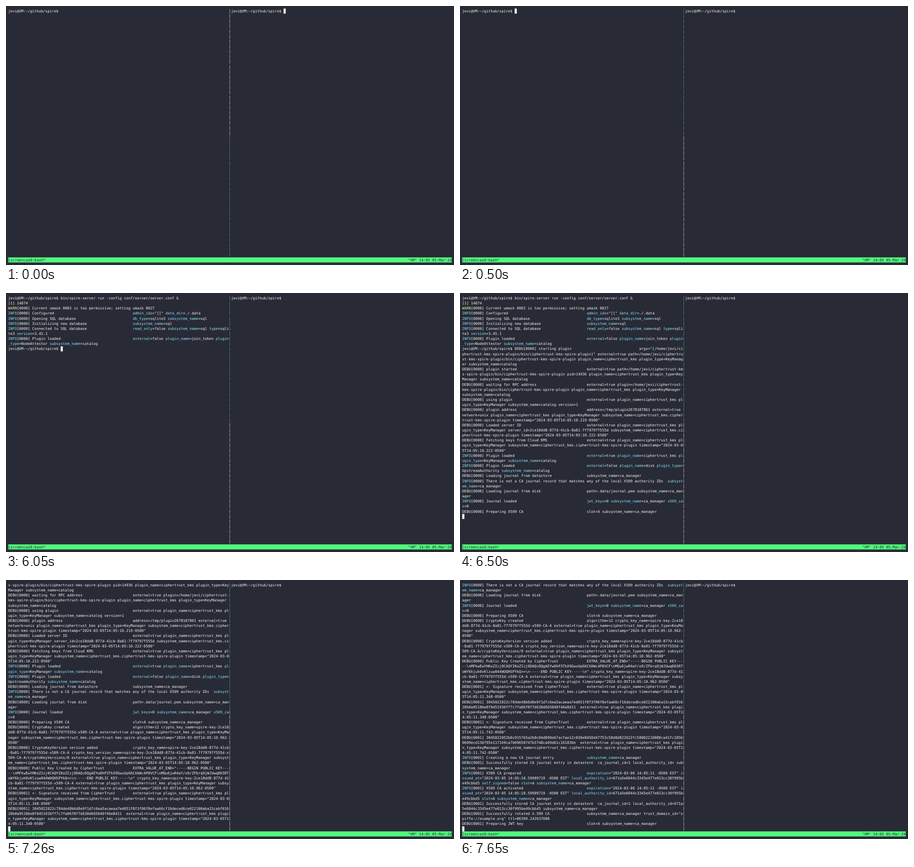
Recreate the animation shown at these times as an HTML page. Size 984 px wide and 569 px high, loop 8 s.

```html
<!DOCTYPE html>
<html lang="en">
<head>
<meta charset="utf-8">
<title>Split terminal</title>
<style>
  html, body { margin: 0; width: 100%; height: 100%; overflow: hidden; background: #282a36; }
  svg { display: block; }
  text {
    font: 7.973px "DejaVu Sans Mono", monospace;
    white-space: pre;
    text-rendering: geometricPrecision;
    font-variant-ligatures: none;
  }
</style>
</head>
<body>
<svg id="stage" width="984" height="569" viewBox="0 0 984 569"></svg>
<script>
const FG = '#f8f8f2', BLACK = '#21222c', GREEN = '#50fa7b', YELLOW = '#f1fa8c', CYAN = '#8be9fd', TEAL = '#6fa7a0';
const CELL_W = 4.8, CELL_H = 569 / 51, LEFT = CELL_W, TOP = CELL_H / 2, BASELINE = 8.34;
const PANE_COLS = 101, PANE_ROWS = 49, COLS = 203;
const LOOP = 8000;

// Transcript
const prompt = 'jevi@VM:~/github/spire$ ';
const command = 'bin/spire-server run -config conf/server/server.conf &';
const bin = '/home/jevi/ciphertrust-kms-spire-plugin/bin/ciphertrust-kms-spire-plugin';
const named = 'plugin_name=ciphertrust_kms plugin_type=KeyManager';
const kms = 'external=true ' + named;
const catalog = 'subsystem_name=catalog';
const manager = 'subsystem_name=ca_manager';
const plugin = 'subsystem_name=ciphertrust_kms.ciphertrust-kms-spire-plugin';
const stamp = t => `timestamp="2024-03-05T14:05:${t}-0500"`;
const kmsAt = t => `${kms} ${plugin} ${stamp(t)}`;
const serverId = '2ce18dd8-877d-41cb-8a81-7f79797f555d';
const key = `spire-key-${serverId}-x509-CA-A`;
const authority = 'local_authority_id=671a5e6044c3345e477e013cc30f995be49cbbd5';
const validity = 'expiration="2024-03-06 14:05:11 -0500 EST" issued_at="2024-03-05 14:05:10.59989719 -0500 EST" ' + authority;
const pem = String.raw`"-----BEGIN PUBLIC KEY-----\nMFkwEwYHKoZIzj0CAQYIKoZIzj0DAQcDQgAEYwOhP3TkX9GwuVp66CXAWc4P8VCF\nMQu6jwR4aY/o9/ZFbrq9jWJUwqD65RToWY6kjuk0vKlzuw044WUQHSPYkQ==\n-----END PUBLIC KEY-----\n"`;
const stored = 'Successfully stored CA journal entry in datastore';
const signed = '<- Signature received from CipherTrust';

// A log entry is a list of [text, colour] runs.
function log(level, sec, message, fields = '') {
  const tint = { INFO: CYAN, WARN: YELLOW }[level] || FG;
  const keys = fields.split(/(\w+)(?==)/).map((s, i) => [s, i % 2 ? tint : FG]);
  return [[level, tint], [`[000${sec}] ${message.padEnd(44)}  `, FG], ...keys];
}
const info = (...a) => log('INFO', ...a);
const debug = (...a) => log('DEBU', ...a);
const plain = s => [[s, FG]];

const entries = [
  plain(prompt + command),
  plain('[1] 14874'),
  log('WARN', 0, 'Current umask 0002 is too permissive; setting umask 0027'),
  info(0, 'Configured', 'admin_ids="[]" data_dir=./.data'),
  info(0, 'Opening SQL database', 'db_type=sqlite3 subsystem_name=sql'),
  info(0, 'Initializing new database', 'subsystem_name=sql'),
  info(0, 'Connected to SQL database', 'read_only=false subsystem_name=sql type=sqlite3 version=3.45.1'),
  info(0, 'Plugin loaded', 'external=false plugin_name=join_token plugin_type=NodeAttestor ' + catalog),
  [...plain(prompt), ...debug(0, 'starting plugin', `args="[${bin}]" external=true path=${bin} ${named} ${catalog}`)],
  debug(0, 'plugin started', `external=true path=${bin} pid=14936 ${named} ${catalog}`),
  debug(0, 'waiting for RPC address', `external=true plugin=${bin} ${named} ${catalog}`),
  debug(0, 'using plugin', `${kms} ${catalog} version=1`),
  debug(0, 'plugin address', `address=/tmp/plugin2678187861 external=true network=unix ${named} ${plugin} ${stamp('10.219')}`),
  debug(0, 'Loaded server ID', `${kms} server_id=${serverId} ${plugin} ${stamp('10.222')}`),
  debug(0, 'Fetching keys from Cloud KMS', kmsAt('10.222')),
  info(0, 'Plugin loaded', `${kms} ${catalog}`),
  info(0, 'Plugin loaded', 'external=false plugin_name=disk plugin_type=UpstreamAuthority ' + catalog),
  debug(0, 'Loading journal from datastore', manager),
  info(0, 'There is not a CA journal record that matches any of the local X509 authority IDs', manager),
  debug(0, 'Loading journal from disk', 'path=.data/journal.pem ' + manager),
  info(0, 'Journal loaded', `jwt_keys=0 ${manager} x509_cas=0`),
  debug(0, 'Preparing X509 CA', 'slot=A ' + manager),
  debug(0, 'CryptoKey created', `algorithm=12 crypto_key_name=${key} ${kmsAt('10.962')}`),
  debug(0, 'CryptoKeyVersion version added',
    `crypto_key_name=${key} crypto_key_version_name=${key}/cryptoKeyVersions/0 ${kmsAt('10.962')}`),
  debug(0, 'Public Key Created by CipherTrust', `EXTRA_VALUE_AT_END=${pem} crypto_key_name=${key} ${kmsAt('10.962')}`),
  debug(1, signed, kmsAt('11.348')),
  debug(1, '3045022022c784de48b6d8e9f1d7c6ea5acaeaa7ed051f8f3f06f8efaa66cf16deced6ce022100aba15cabf016' +
    '28b0a9518be8f0451936ff7c7fa06f8f7d630d665040f46e8d11', kmsAt('11.348')),
  debug(1, signed, kmsAt('11.742')),
  debug(1, '3045022052b0c9157b5a2b0c04d899e67acfae12c030e8450d47753c58d8d822622fc58002210088ca41fc1856' +
    '0609ecd136f95e117169ca7b69650747b3748ca69d61c161836e', kmsAt('11.742')),
  info(1, 'Creating a new CA journal entry', manager),
  debug(1, stored, 'ca_journal_id=1 local_authority_id= ' + manager),
  info(1, 'X509 CA prepared', `${validity} self_signed=false slot=A ${manager}`),
  info(1, 'X509 CA activated', `${validity} slot=A ${manager}`),
  debug(1, stored, `ca_journal_id=1 ${authority} ${manager}`),
  debug(1, 'Successfully rotated X.509 CA', manager + ' trust_domain_id="spiffe://example.org" ttl=86399.242637088'),
  debug(1, 'Preparing JWT key', 'slot=A ' + manager),
];

// Break an entry into pane-wide lines of [text, colour, column] runs.
function wrap(runs) {
  const lines = [[]];
  let col = 0;
  for (let [text, color] of runs) {
    while (text) {
      if (col === PANE_COLS) { lines.push([]); col = 0; }
      const part = text.slice(0, PANE_COLS - col);
      lines[lines.length - 1].push([part, color, col]);
      col += part.length;
      text = text.slice(part.length);
    }
  }
  return lines;
}
const lines = entries.flatMap(wrap);

// [start ms, finished lines, text on the cursor line, right pane active]
const steps = [
  [0, 0, prompt, true],
  [500, 0, prompt],
  [5500, 0, prompt + command],
  [5950, 2, ''],
  [6007, 10, prompt],
  [6063, 20, ''],
  [6120, 31, ''],
  [6500, 43, ''],
  [6870, 56, ''],
  [7260, 63, ''],
  [7650, 84, ''],
];

// Drawing
const stage = document.getElementById('stage');
const px = col => LEFT + col * CELL_W;
const py = row => TOP + row * CELL_H;

function add(parent, tag, attrs, text) {
  const el = document.createElementNS('http://www.w3.org/2000/svg', tag);
  for (const k in attrs) el.setAttribute(k, attrs[k]);
  if (text) el.textContent = text;
  return parent.appendChild(el);
}
const put = (parent, text, col, row, fill = FG) =>
  add(parent, 'text', { x: px(col).toFixed(2), y: (py(row) + BASELINE).toFixed(2), fill }, text);
const block = (parent, col, row, span, fill) =>
  add(parent, 'rect', { x: px(col), y: py(row), width: span * CELL_W, height: CELL_H, fill });

const clock = '"VM" 14:05 05-Mar-24';
add(stage, 'rect', { width: 984, height: 569, fill: '#282a36' });
block(stage, 0, PANE_ROWS, COLS, GREEN);
put(stage, '[screencas0:bash*', 0, PANE_ROWS, BLACK);
put(stage, clock, COLS - clock.length, PANE_ROWS, BLACK);
put(stage, prompt, PANE_COLS + 1, 0);
const divider = Array.from({ length: PANE_ROWS }, (_, row) => put(stage, '│', PANE_COLS - 0.08, row));
const pane = add(stage, 'g', {});

function draw([, count, tail, rightActive = false]) {
  const top = Math.max(0, count - PANE_ROWS + 1);
  const cursorRow = count - top;
  pane.replaceChildren();
  lines.slice(top, count).forEach((runs, row) => {
    for (const [text, color, col] of runs) if (text.trim()) put(pane, text, col, row, color);
  });
  if (tail) put(pane, tail, 0, cursorRow);
  if (rightActive) block(pane, PANE_COLS + 1 + prompt.length, 0, 1, FG);
  else block(pane, tail.length, cursorRow, 1, FG);
  divider.forEach((bar, row) => bar.setAttribute('fill', (row < 25) === rightActive ? FG : TEAL));
}

const start = performance.now();
let shown;
function tick() {
  const t = (performance.now() - start) % LOOP;
  const step = steps.findLast(s => s[0] <= t);
  if (step !== shown) draw(shown = step);
  requestAnimationFrame(tick);
}
tick();
</script>
</body>
</html>
```
